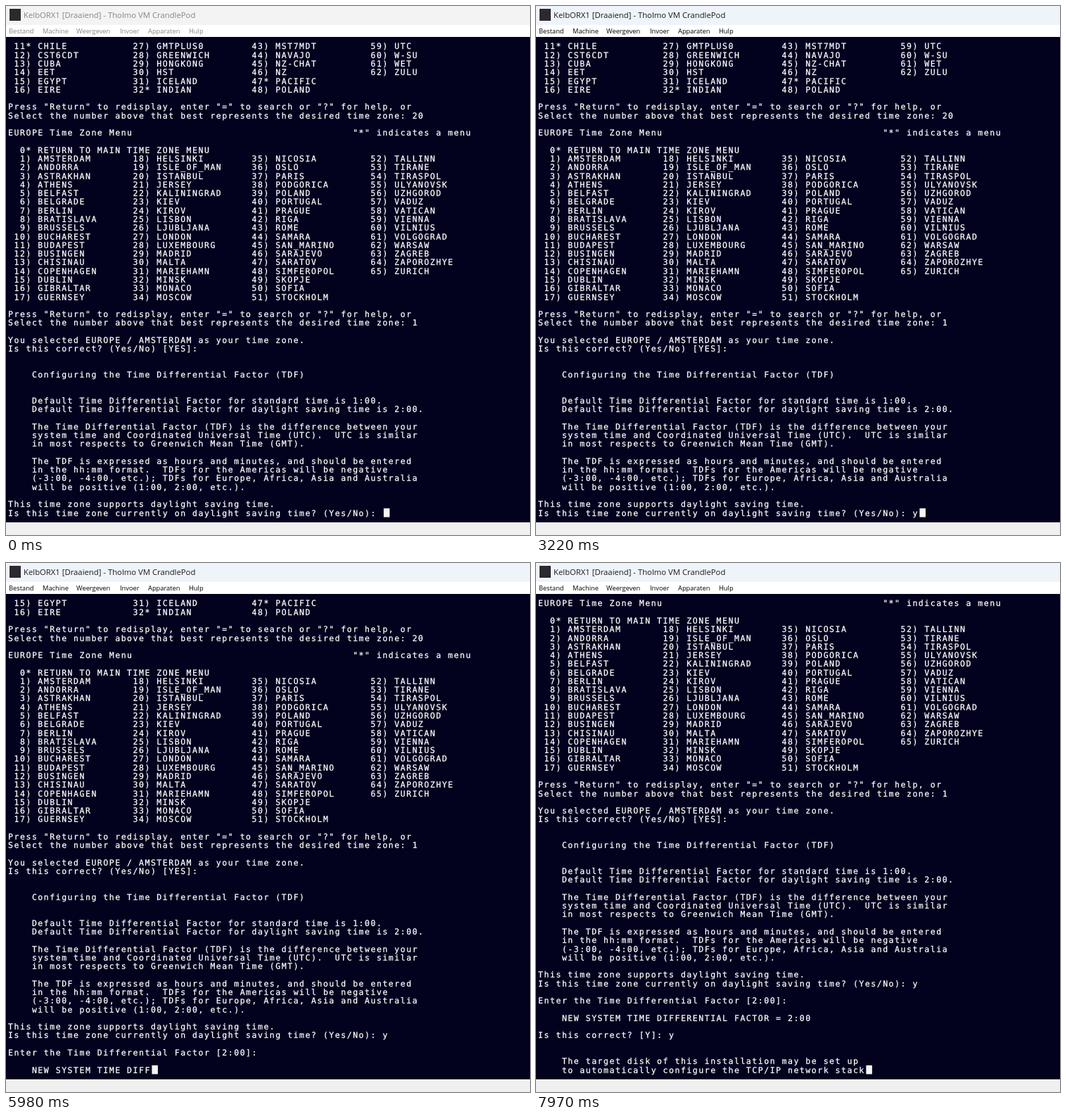
Write an HTML page that moves like this. It is 745 px wide and 752 px high and loops after 8000 ms.

```html
<!DOCTYPE html>
<html lang="nl">
<head>
<meta charset="utf-8">
<title>Terminal</title>
<style>
html, body { margin: 0; width: 100%; height: 100%; overflow: hidden; background: #f0f0f0; }
svg { display: block; width: 745px; height: 752px; }
.ui { font-family: "Open Sans", "Noto Sans", sans-serif; }
#term text {
  font: 11.5px "DejaVu Sans Mono", monospace;
  letter-spacing: 1.526px;
  text-rendering: geometricPrecision;
  white-space: pre;
  fill: #fff; stroke: #fff; stroke-width: .25px;
}
</style>
</head>
<body>
<svg viewBox="0 0 745 752">
  <rect width="745" height="752" fill="#f0f0f0"/>
  <rect id="bar" width="745" height="27"/>
  <rect x="5" y="4" width="16" height="17" fill="#2c2930"/>
  <text id="title" class="ui" x="25" y="17" font-size="11.3">KelbORX1 [Draaiend] - Tholmo VM CrandlePod</text>
  <rect y="27" width="745" height="17" fill="#fff"/>
  <g id="menu" class="ui" font-size="9.3"></g>
  <rect y="44" width="745" height="690" fill="#02021e"/>
  <g id="term"></g>
  <rect id="caret" width="8.5" height="12.5" fill="#f4f4f4"/>
  <path id="mouse" d="M.5 .5V16l3.6-3.4L6.5 18.4l2.3-1L6.4 11.8h5z" fill="#fff" stroke="#000" stroke-width=".8"/>
</svg>
<script>
const LOOP = 8000, ROWS = 55, COL = 8.45, ROW = 12.28, TICK = 30;
const $ = id => document.getElementById(id);

function el(tag, attrs, parent, text = '') {
  const node = document.createElementNS('http://www.w3.org/2000/svg', tag);
  for (const k in attrs) node.setAttribute(k, attrs[k]);
  node.textContent = text;
  return parent.appendChild(node);
}

// Columns of numbered choices; "*" before a name marks a submenu.
function table(columns, rows) {
  return Array.from({ length: rows }, (_, r) => columns.map(([first, names]) => {
    const name = names.split(' ')[r];
    if (!name) return '';
    const mark = name[0] === '*' ? '*' : ')';
    return ` ${String(first + r).padStart(2)}${mark} ${name.replace('*', '')}`.padEnd(20);
  }).join('').trimEnd()).join('\n');
}

const zones = table([
  [11, '*CHILE CST6CDT CUBA EET EGYPT EIRE'],
  [27, 'GMTPLUS0 GREENWICH HONGKONG HST ICELAND *INDIAN'],
  [43, 'MST7MDT NAVAJO NZ-CHAT NZ *PACIFIC POLAND'],
  [59, 'UTC W-SU WET ZULU']
], 6);

const europe = table([
  [1, 'AMSTERDAM ANDORRA ASTRAKHAN ATHENS BELFAST BELGRADE BERLIN BRATISLAVA BRUSSELS BUCHAREST BUDAPEST BUSINGEN CHISINAU COPENHAGEN DUBLIN GIBRALTAR GUERNSEY'],
  [18, 'HELSINKI ISLE_OF_MAN ISTANBUL JERSEY KALININGRAD KIEV KIROV LISBON LJUBLJANA LONDON LUXEMBOURG MADRID MALTA MARIEHAMN MINSK MONACO MOSCOW'],
  [35, 'NICOSIA OSLO PARIS PODGORICA POLAND PORTUGAL PRAGUE RIGA ROME SAMARA SAN_MARINO SARAJEVO SARATOV SIMFEROPOL SKOPJE SOFIA STOCKHOLM'],
  [52, 'TALLINN TIRANE TIRASPOL ULYANOVSK UZHGOROD VADUZ VATICAN VIENNA VILNIUS VOLGOGRAD WARSAW ZAGREB ZAPOROZHYE ZURICH']
], 17);

const ask = n => `Press "Return" to redisplay, enter "=" to search or "?" for help, or
Select the number above that best represents the desired time zone: ${n}`;

const opening = `${zones}

${ask(20)}

${'EUROPE Time Zone Menu'.padEnd(58)}"*" indicates a menu

  0* RETURN TO MAIN TIME ZONE MENU
${europe}

${ask(1)}

You selected EUROPE / AMSTERDAM as your time zone.
Is this correct? (Yes/No) [YES]:


    Configuring the Time Differential Factor (TDF)


    Default Time Differential Factor for standard time is 1:00.
    Default Time Differential Factor for daylight saving time is 2:00.

    The Time Differential Factor (TDF) is the difference between your
    system time and Coordinated Universal Time (UTC).  UTC is similar
    in most respects to Greenwich Mean Time (GMT).

    The TDF is expressed as hours and minutes, and should be entered
    in the hh:mm format.  TDFs for the Americas will be negative
    (-3:00, -4:00, etc.); TDFs for Europe, Africa, Asia and Australia
    will be positive (1:00, 2:00, etc.).

This time zone supports daylight saving time.
Is this time zone currently on daylight saving time? (Yes/No): `;

// Terminal output: start, duration, text.
const output = [
  [3220, 0, 'y'],
  [4360, 0, '\n'],
  [4360, 420, '\nEnter the Time Differential Factor [2:00]: '],
  [5950, 0, '\n'],
  [5950, 60, '\n    NEW SYSTEM TIME DIFFERENTIAL FACTOR = 2:00\n\n'],
  [6010, 210, 'Is this correct? [Y]: '],
  [7410, 0, 'y'],
  [7840, 0, '\n'],
  [7880, 90, '\n\n    The target disk of this installation may be set up\n    to automatically configure the TCP/IP network stack']
];

function screenText(t) {
  let s = opening;
  for (const [start, dur, text] of output) {
    if (t < start) break;
    const p = dur ? Math.min(1, Math.floor((t - start) / TICK) * TICK / dur) : 1;
    s += text.slice(0, Math.round(p * text.length));
  }
  return s;
}

[['Bestand', 4], ['Machine', 52], ['Weergeven', 100], ['Invoer', 162], ['Apparaten', 202], ['Hulp', 260]]
  .forEach(([label, x]) => el('text', { x, y: 39 }, $('menu'), label));

const lines = Array.from({ length: ROWS }, (_, r) =>
  el('text', { x: 3.1, y: (61.4 + r * ROW).toFixed(2) }, $('term')));

let shown = '';
function drawTerm(t) {
  const s = screenText(t);
  if (s === shown) return;
  shown = s;
  const view = s.split('\n').slice(-ROWS);
  lines.forEach((line, r) => {
    if (line.textContent !== view[r]) line.textContent = view[r];
  });
  $('caret').setAttribute('x', 4.6 + view[ROWS - 1].length * COL);
  $('caret').setAttribute('y', 51 + (ROWS - 1) * ROW);
}

function drawWindow(t) {
  const active = t >= 1430;
  $('bar').setAttribute('fill', active ? '#eff4fb' : '#f3f3f3');
  $('title').setAttribute('fill', active ? '#1a1a1a' : '#868686');
  $('menu').setAttribute('fill', active ? '#000' : '#868686');
}

const ease = p => p * p * (3 - 2 * p);
const mix = (a, b, p) => a + (b - a) * p;

// The pointer sweeps in from the right, turns and settles before the click.
function drawMouse(t) {
  const on = t >= 420 && t < 1490;
  $('mouse').setAttribute('visibility', on ? 'visible' : 'hidden');
  if (!on) return;
  const a = ease(Math.min(1, (t - 420) / 320));
  const b = ease(Math.min(1, Math.max(0, (t - 740) / 260)));
  const x = mix(mix(688, 544, a), 623, b);
  const y = mix(mix(456, 404, a), 448, b);
  $('mouse').setAttribute('transform', `translate(${x.toFixed(1)} ${y.toFixed(1)})`);
}

function draw(now) {
  const t = now % LOOP;
  drawWindow(t);
  drawTerm(t);
  drawMouse(t);
}

const t0 = performance.now();
function loop() {
  draw(performance.now() - t0);
  requestAnimationFrame(loop);
}
loop();
</script>
</body>
</html>
```
